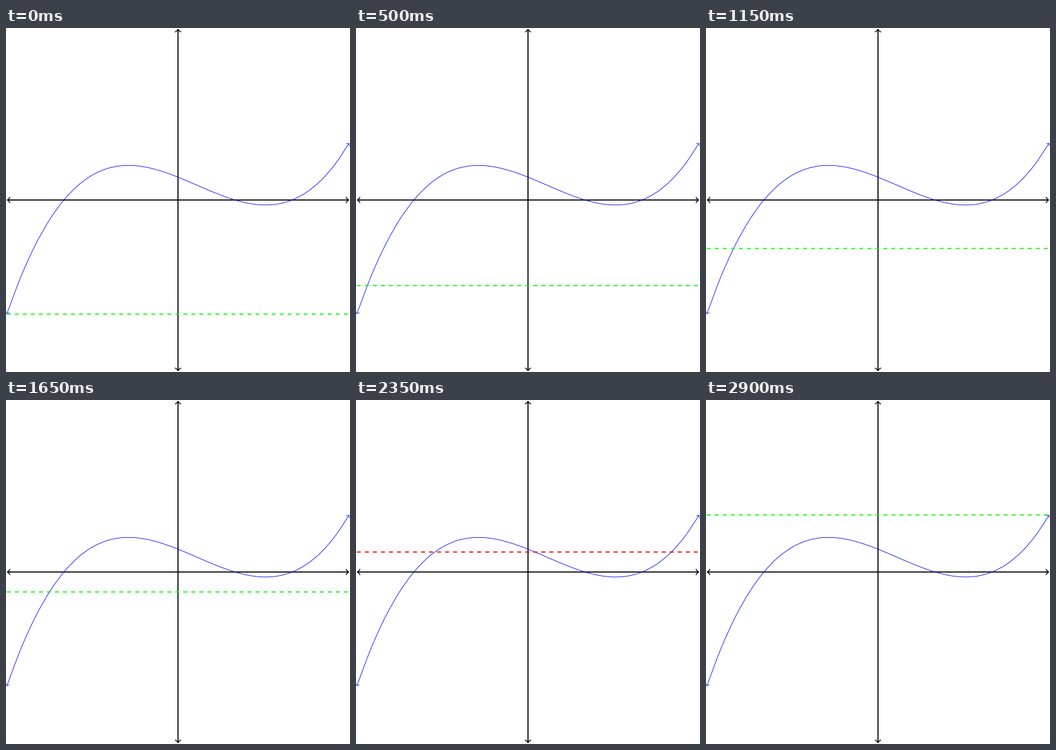
Recreate the animation shown at these times as a matplotlib script. Size 534 by 534 pixels, loop 2950 ms.

```python
import numpy as np
import matplotlib.pyplot as plt
from matplotlib.animation import FuncAnimation
from matplotlib.patches import PathPatch
from matplotlib.path import Path

SIZE = 534
DPI = 128
PT = 150 / 72.27            # pixels per TeX point
UNIT = 1.5 / 2.54 * 150     # pixels per graph unit
THICK, THIN = 0.8 * PT, 0.4 * PT
FRAMES, INTERVAL = 59, 50
STEP = 0.05

fig = plt.figure(figsize=(SIZE / DPI, SIZE / DPI), dpi=DPI, facecolor="white")
ax = fig.add_axes([0, 0, 1, 1])
ax.set_xlim(0, SIZE)
ax.set_ylim(0, SIZE)
ax.axis("off")


def f(x):
    return 0.1 * (x + 2) * (x - 1) * (x - 2)


def to_px(x, y):
    return np.column_stack([x, y]) * UNIT + SIZE / 2


def lw(px):
    return px * 72 / DPI


def stroke(points, codes, color, width, cap="butt"):
    ax.add_patch(PathPatch(Path(points, codes), fill=False, ec=color,
                           lw=lw(width), capstyle=cap, joinstyle="round",
                           snap=False))


def unit_vector(v):
    return v / np.hypot(*v)


def tip_length(width):
    return 0.21 * PT + 0.625 * width


def arrow_tip(end, direction, color, width):
    """Curved barbs whose outer point touches `end`."""
    a = 0.28 * PT + 0.3 * width
    shape = a * np.array([(-3, 4), (-2.75, 2.5), (0, 0.25), (0.75, 0),
                          (0, -0.25), (-2.75, -2.5), (-3, -4)])
    u = unit_vector(direction)
    base = end - u * tip_length(width)
    points = base + shape @ np.array([u, (-u[1], u[0])])
    stroke(points, [Path.MOVETO] + [Path.CURVE4] * 6, color, 0.8 * width, "round")


def double_arrow(knots, color, width, tension=0.55):
    """Smooth path through the knots with an arrow tip at both ends."""
    p = knots.copy()
    for end, inner in ((0, 1), (-1, -2)):
        u = unit_vector(knots[end] - knots[inner])
        arrow_tip(knots[end], u, color, width)
        p[end] = knots[end] - u * tip_length(width)
    handle = np.zeros_like(p)
    handle[1:-1] = 0.2775 * tension * (p[2:] - p[:-2])
    points = [p[0]]
    for i in range(len(p) - 1):
        points += [p[i] + handle[i], p[i + 1] - handle[i + 1], p[i + 1]]
    stroke(points, [Path.MOVETO] + [Path.CURVE4] * (len(points) - 1), color, width)


span = np.array([-3.0, 3.0])
double_arrow(to_px(span, 0 * span), "black", THICK)
double_arrow(to_px(0 * span, span), "black", THICK)
xs = np.linspace(-3, 3, 25)
double_arrow(to_px(xs, f(xs)), "blue", THIN)

sweep, = ax.plot([], [], lw=lw(THICK), ls=(0, (3.75, 3.75)),
                 dash_capstyle="butt", snap=False, zorder=5)

# Heights of the local minimum and maximum of the cubic
LOW, HIGH = f((1 + np.sqrt(13)) / 3), f((1 - np.sqrt(13)) / 3)


def update(i):
    k = i if i <= 50 else i + 2     # the sweep skips past the local maximum
    level = -2 + STEP * k
    sweep.set_data(*to_px(span, np.full(2, level)).T)
    sweep.set_color("red" if LOW < level < HIGH else "lime")
    return sweep,


anim = FuncAnimation(fig, update, frames=FRAMES, interval=INTERVAL,
                     repeat=True, repeat_delay=0, blit=False)
plt.show()
```
